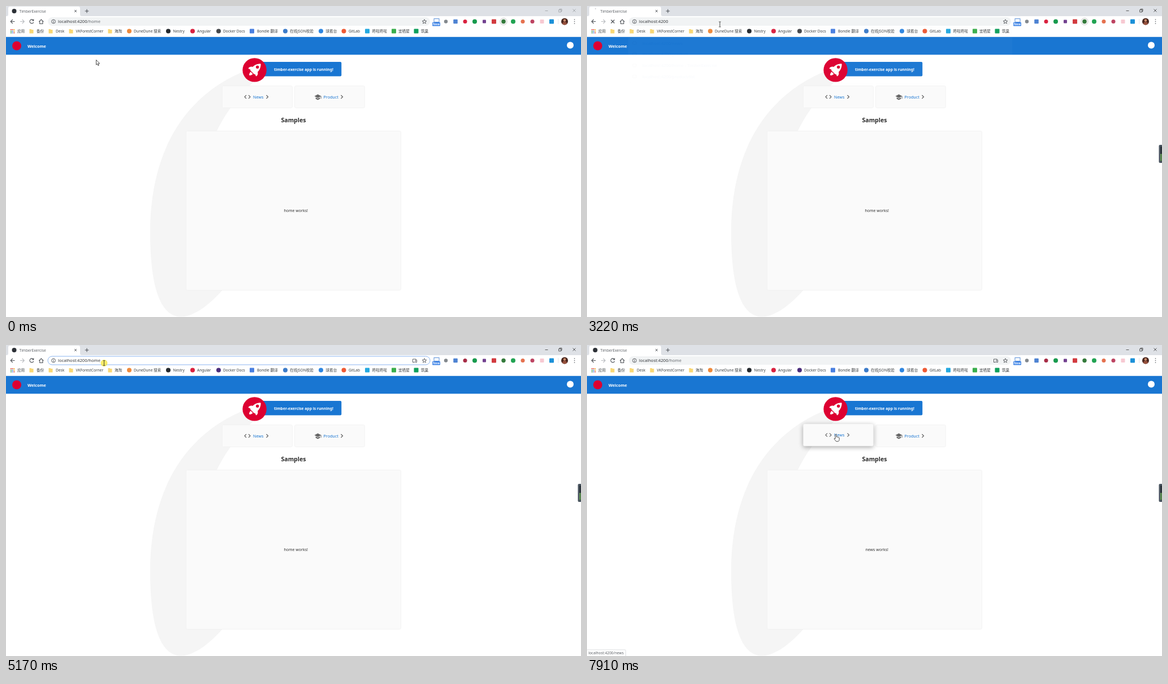
Write an HTML page that moves like this. It is 1017 px wide and 551 px high and loops after 7.99 s.

```html
<!DOCTYPE html>
<html lang="zh-CN">
<head>
<meta charset="utf-8">
<title>TimberExercise</title>
<style>
  html, body { margin: 0; width: 100%; height: 100%; overflow: hidden; background: #fff; }
  svg { display: block; width: 1017px; height: 551px; font: 6.6px "Noto Sans", "Noto Sans CJK SC", "Noto Sans CJK", sans-serif; }
  text { white-space: pre; }
  .line { fill: none; stroke: #4d5156; stroke-width: 1.1; }
</style>
</head>
<body>
<svg id="stage" viewBox="0 0 1017 551"></svg>
<script>
const LOOP = 7990;
const stage = document.getElementById('stage');

const rect = (x, y, w, h, fill, more = '') => `<rect x="${x}" y="${y}" width="${w}" height="${h}" fill="${fill}" ${more}/>`;
const dot = (x, y, r, fill, more = '') => `<circle cx="${x}" cy="${y}" r="${r}" fill="${fill}" ${more}/>`;
const text = (x, y, str, fill = '#3c4043', more = '') => `<text x="${x}" y="${y}" fill="${fill}" ${more}>${str}</text>`;
const line = (d, more = '') => `<path class="line" d="${d}" ${more}/>`;
const group = (id, body, more = '') => `<g id="${id}" ${more}>${body}</g>`;
const square = (x, y, s, fill) => rect(x - s / 2, y - s / 2, s, s, fill, 'rx="1"');
const chevron = x => line(`M${x - 1.5} 158l3 3l-3 3`, 'style="stroke:#666;stroke-width:1.3"');

// Bookmarks: icon kind, icon x, colour, label x, label
const marks = [
  ['folder', 45, '', 54, '备份'],
  ['folder', 79, '', 88, 'Desk'],
  ['folder', 115, '', 123.5, 'VKForestCorner'],
  ['folder', 184, '', 192, '海淘'],
  ['dot', 218, '#ee8a3c', 226, 'DuneDune 搜索'],
  ['dot', 287, '#24292e', 295.5, 'Nestry'],
  ['dot', 330, '#d9213f', 338, 'Angular'],
  ['dot', 376, '#44474b', 384, 'Docker Docs', 'docker'],
  ['square', 435, '#4a80e0', 444, 'Bondle 翻译'],
  ['dot', 494, '#3d7cc9', 502, '在线JSON校验'],
  ['dot', 557, '#2f86e0', 565.5, '球看台'],
  ['dot', 597.5, '#ee5a35', 606, 'GitLab'],
  ['square', 639, '#25a9e0', 647.5, '咚啦咚啦'],
  ['square', 686, '#3aae4c', 694, '宜栖屋'],
  ['square', 725.5, '#0f9f5c', 734, '筑巢']
];
const folder = x => `<path d="M${x - 3.5} 41h3l1 1h3v6.500h-7z" fill="#f8d775"/>`;
const mark = ([kind, x, fill, tx, label, id]) =>
  (kind === 'folder' ? folder(x) : kind === 'dot' ? dot(x, 44.5, 4, fill, id ? `id="${id}"` : '') : square(x, 44.5, 8, fill)) +
  text(tx, 47, label);

const apps = ['#e04a3f', '#e04a3f', '#f0b429', '#3f9d58', '#4a80e0', '#f0b429', '#3f9d58', '#4a80e0', '#e04a3f']
  .map((c, i) => rect(8 + i % 3 * 2.8, 41 + Math.floor(i / 3) * 2.8, 1.8, 1.8, c)).join('');

const addons =
  rect(757, 22.5, 9, 6, '#fff', 'stroke="#5a8fd8"') + rect(754, 29, 14, 6.5, '#3d83e6', 'rx="1"') +
  text(761, 34.2, 'New', '#fff', 'font-size="5.5" font-weight="600" text-anchor="middle"') +
  dot(778, 27.5, 3.2, '#83898e') + square(795, 27.5, 7.5, '#4d82d2') +
  dot(812, 27.5, 3.5, '#d9213f', 'id="addon"') + dot(829, 27.5, 4, '#179a4d') +
  square(846, 27.5, 6, '#71408f') + square(863, 27.5, 8, '#d23a3f') +
  dot(880, 27.5, 6.3, '#eef0ee', 'stroke="#c9ccc9" stroke-width=".7" id="ring"') + dot(880, 27.5, 3.7, '#337a3b') +
  dot(897, 27.5, 4, '#21a352') + dot(914, 27.5, 3.5, '#e5714f') + dot(931, 27.5, 3.5, '#bd4361') +
  square(948, 27.5, 7, '#f7c9d2') + square(965, 27.5, 8, '#1b90d8') +
  rect(976.5, 23, 0.7, 9, '#d5d8dc') + dot(988, 27.5, 6, '#47241d') +
  '<path d="M984 32q0-4 4-4t4 4q-4 3-8 0z" fill="#96503c"/>' + dot(988, 25.5, 2.3, '#c98b6c') +
  [24, 27.5, 31].map(y => dot(1005.5, y, 0.8, '#4d5156')).join('');

const nav =
  line('M15.500 27.500h-7M11.700 24l-3.500 3.500l3.500 3.500') +
  line('M25 27.500h7M28.800 24l3.500 3.500l-3.500 3.500', 'style="stroke:#b9bcc0"') +
  group('reload', line('M48.500 25.500a3.500 3.500 0 1 0 .3 3.200') + '<path d="M49.300 23v3.500h-3.500z" fill="#4d5156"/>') +
  group('stop', line('M42.500 24.500l6 6M48.500 24.500l-6 6', 'style="stroke-width:1.300"')) +
  line('M58.300 27.800l4-3.800l4 3.800M59.700 27v4.500h5.200v-4.500');

const rows = ['localhost:4200', 'localhost:4200/news', 'localhost:4200/product', 'localhost:4200/home - TimberExercise', 'localhost:4200/product/list'];
const popup = group('popup',
  rect(73, 20, 679, 116, '#fff', 'rx="7" filter="url(#soft)"') +
  rect(73, 36.5, 679, 19.5, '#e8eaed') +
  rows.map((r, i) => line(`M81 ${43.5 + i * 19.7}h6v5h-6z`, 'style="stroke:#777;stroke-width:.8"') +
    text(98, 49 + i * 19.7, r, i ? '#1967d2' : '#333', 'font-size="7.4"')).join(''));

const omnibox =
  rect(74, 20, 676, 15, '#f1f3f4', 'rx="7.5" id="bar"') +
  group('info', '<circle class="line" cx="84" cy="27.5" r="3.4" style="stroke-width:.9"/>' +
    rect(83.5, 27, 1, 2.7, '#4d5156') + rect(83.5, 25.3, 1, 1, '#4d5156')) +
  dot(84, 27.5, 4.2, '#2c3036', 'id="site"') +
  rect(0, 22.5, 0, 10.5, '#a4c8f6', 'id="sel"') +
  '<text id="url" y="30.3" font-size="7.6"><tspan id="host" fill="#33363a">localhost:4200</tspan><tspan id="path">/home</tspan></text>' +
  rect(0, 22.5, 0.8, 10, '#333', 'id="caret"') +
  group('device', line('M719.500 30v-5h6M719 30.500h4M724 26.500h2.500v4h-2.500z', 'style="stroke-width:.9"')) +
  group('star', line('M740 23.800l1.100 2.500 2.700.2-2.100 1.800.7 2.700-2.400-1.500-2.400 1.500.7-2.700-2.100-1.800 2.700-.2z', 'style="stroke-width:.9"'));

const tabs =
  rect(0, 0, 1017, 18, '#dee1e6') +
  '<path d="M1 18q3 0 3-3V4q0-3 3-3h121q3 0 3 3v11q0 3 3 3z" fill="#fff"/>' +
  dot(14.5, 9, 4, '#2c3036', 'id="icon"') +
  '<path id="spin" d="M14.500 4.800a4.200 4.200 0 1 1-4.200 4.200" fill="none" stroke="#8a9097" stroke-width="1.200"/>' +
  text(23.5, 11.5, 'TimberExercise', '#5f6368') +
  line('M121 7l4 4M125 7l-4 4', 'style="stroke-width:.9"') + line('M139.700 9h6.600M143 5.700v6.600') +
  `<path id="win" fill="none" stroke-width=".8" d="M953.500 8.500h5M977.700 6.800h4v4h-4zM979 6.800v-1.400h4v4h-1.300M1002.500 5.500l5 5M1007.500 5.500l-5 5"/>`;

const smoke = '<path transform="translate(255 104.500) scale(.4116) translate(-147.020 -140.940)" fill="#f5f5f5" ' +
  'd="M644.600 141S143 215.500 147 870.200s342.800 201.800 342.800 201.800S404.700 847.200 388.800 762.200c-27.100-145.500-11.600-384.100 271.900-609.100C671.100 139.400 644.600 141 644.600 141z"/>';

const rocket = dot(439.6, 113.4, 21.2, '#dd0031') +
  '<g transform="translate(428.500 102.300) scale(.4168)" fill="#fff">' +
  '<path d="M3.800 46a3.100 3.100 0 0 0 3.500 3.500a21.400 21.400 0 0 0 12.200-6.100L9.900 33.800A21.400 21.400 0 0 0 3.800 46z"/>' +
  '<path d="M53.300 3.200A3.100 3.100 0 0 0 50.100 0A48.200 48.200 0 0 0 18.300 13.400c-6-1.700-15-1.200-18.300 7.200A33.900 33.900 0 0 1 9.400 25.100l-.3.700a3 3 0 0 0 .6 3.500L24 43.600a2.900 2.900 0 0 0 3.500.6l.7-.3A33.900 33.900 0 0 1 32.600 53.300c8.600-3.700 8.900-12.300 7.200-18.300A48.200 48.200 0 0 0 53.300 3.200z"/></g>' +
  dot(444.7, 108.3, 2.7, '#dd0031');

const page = smoke +
  rect(0, 54.56, 1017, 31.78, '#1976d2') + dot(19, 70.5, 8, '#dd0031') + dot(998, 69.5, 6, '#fff') +
  text(38, 73.6, 'Welcome', '#fff', 'font-size="7.2" font-weight="600"') +
  rect(440, 99, 153.3, 25.5, '#1976d2', 'rx="2"') + rocket +
  text(474, 114.5, 'timber-exercise app is running!', '#fff', 'font-size="6.75" font-weight="600"') +
  rect(510.5, 141.5, 124, 39, '#fafafa', 'rx="2" stroke="#eee" stroke-width=".6"') +
  '<path d="M545.500 159.700l6-3.300 6 3.300-6 3.300zM547.700 162l3.800 2.100 3.800-2.100v2.400l-3.800 2.100-3.800-2.100z" fill="#666"/>' + rect(556.7, 159.7, 0.9, 4.5, '#666') +
  text(561.5, 163.6, 'Product', '#1976d2', 'font-size="7.15"') + chevron(594) +
  group('card', rect(382.5, 141.5, 124, 39, '#000', 'rx="2" filter="url(#lift)" id="shade"') +
    rect(382.5, 141.5, 124, 39, '#fafafa', 'rx="2" stroke="#eee" stroke-width=".6"') +
    line('M425 158l-3 3l3 3M429 158l3 3l-3 3', 'style="stroke:#666;stroke-width:1.200"') +
    text(437, 163.6, 'News', '#1976d2', 'font-size="7.2"') + chevron(462)) +
  text(508.5, 205.6, 'Samples', '#2b2b2b', 'font-size="10.6" font-weight="600" text-anchor="middle"') +
  rect(318.5, 221.5, 380, 282, '#fafafa', 'rx="2" stroke="#eee" stroke-width=".6"') +
  text(512.7, 365, 'home works!', '#333', 'font-size="7" text-anchor="middle" id="out"') +
  rect(0, 54.56, 1017, 497, '#fff', 'id="blank"');

const widget = group('widget', rect(1011.5, 246, 8, 32, '#4a5560', 'rx="2"') +
  rect(1014, 249, 3, 26, '#2c343c') + rect(1014.3, 262, 2, 12.5, '#6fae5c', 'id="meter"'));

const status = group('status', rect(-1, 540, 69.5, 13, '#fff', 'stroke="#d4d6d9" stroke-width=".8" rx="1.500" id="tip"') +
  text(2.5, 547.8, '', '#5f6368', 'font-size="6.5" id="tipText"'));

const pointer = group('pointer',
  dot(0, 0, 6, '#f5e642', 'fill-opacity=".8" id="press"') +
  group('arrow', '<path d="M0 0v8.700l2-1.800 1.400 3.200 1.400-.6-1.400-3.100h2.800z" fill="#fff" stroke="#222" stroke-width=".8"/>') +
  group('ibeam', line('M-1.800-4.500h1.300l.5.400.5-.4h1.300M0-4.200v8.400M-1.800 4.500h1.300l.5-.4.5.4h1.300', 'style="stroke:#222;stroke-width:.8"')) +
  group('hand', '<path d="M-1.300.8q0-1.500 1.100-1.500t1.100 1.500v3.200q1-.7 1.700.3 1.200-.5 1.700.5 1.400-.2 1.400 1.200v2.500q0 2.700-1.900 3.300h-3.600q-1.400-1.600-3.600-4.600.1-1.600 2.100-.3z" fill="#fff" stroke="#222" stroke-width=".8"/>'));

stage.innerHTML =
  '<defs><filter id="soft" x="-5%" y="-20%" width="110%" height="140%"><feDropShadow dx="0" dy="1" stdDeviation="2.500" flood-opacity=".35"/></filter>' +
  '<filter id="lift" x="-20%" y="-50%" width="140%" height="220%"><feOffset dy="2.100"/><feGaussianBlur stdDeviation="4.500"/></filter></defs>' +
  rect(0, 0, 1017, 551, '#fff') + page + tabs + rect(0, 18, 1017, 36.56, '#fff') + nav + apps + text(20, 47, '应用') +
  marks.map(mark).join('') + addons + popup + omnibox + widget + status + pointer;

const el = {};
stage.querySelectorAll('[id]').forEach(n => el[n.id] = n);
const show = (id, on) => el[id].style.opacity = +on;
const set = (id, attrs) => { for (const k in attrs) el[id].setAttribute(k, attrs[k]); };
const between = (t, a, b) => t >= a && t < b;

// Pointer keys: time, x, y, shape from then on
const path = [
  [0, 159.5, 95.5, 'arrow'], [70, 159.5, 95.5, 'arrow'], [370, 120, 58, 'arrow'], [600, 89, 27, 'ibeam'],
  [900, 146.5, 22.8, 'ibeam'], [980, 146.5, 22.8, 'ibeam'], [1140, 146.5, 25, 'ibeam'], [1210, 146.5, 25, 'ibeam'],
  [1290, 146.5, 27, 'ibeam'], [1520, 147, 27, 'ibeam'], [1600, 151, 27.5, 'ibeam'], [1910, 235, 32.5, 'ibeam'],
  [4560, 235, 32.5, 'ibeam'], [4760, 215, 32, 'ibeam'], [4860, 215, 32, 'ibeam'], [5000, 195, 32, 'ibeam'],
  [5660, 97, 32, 'ibeam'], [5790, 76, 30, 'arrow'], [5890, 76, 30, 'arrow'], [6140, 157.5, 27, 'arrow'],
  [6370, 157.5, 27, 'arrow'], [6700, 270, 110, 'arrow'], [7130, 446, 222, 'arrow'], [7210, 446, 226, 'arrow'],
  [7290, 443, 176, 'hand'], [7480, 440.5, 159, 'hand'], [LOOP, 440.5, 159, 'hand']
];
const STEP = 77;
function pose(t) {
  t = Math.max(0, 140 + STEP * Math.floor((t - 140) / STEP));
  const i = path.findIndex((k, n) => t < path[n + 1][0]);
  const [a, b] = [path[i], path[i + 1]];
  const p = (t - a[0]) / (b[0] - a[0]);
  return { x: a[1] + (b[1] - a[1]) * p, y: a[2] + (b[2] - a[2]) * p, shape: a[3] };
}

const URL_X = 92;
const stops = Array.from({ length: 20 }, (_, i) => URL_X + (i ? el.url.getSubStringLength(0, i) : 0));
const snap = x => stops.reduce((a, b) => Math.abs(b - x) < Math.abs(a - x) ? b : a);

function drawUrl(t, at) {
  const typed = between(t, 2760, 3220);
  const edit = between(t, 1290, 2760), again = between(t, 5000, 7560);
  const focus = edit || again;
  const x = typed ? URL_X + 6 : URL_X;
  set('url', { x });
  el.path.style.display = between(t, 2760, 3760) ? 'none' : '';
  set('path', { fill: focus ? '#33363a' : '#666a6f' });
  set('bar', { fill: focus || typed ? '#fff' : '#f1f3f4', stroke: focus ? '#8ab4f0' : 'none' });
  show('info', !typed);
  show('site', typed);
  show('star', !typed);
  show('device', edit || t >= 5000);

  let from = 0, to = 0;
  if (edit) { from = stops[14]; to = Math.max(from, snap(at.x)); }
  if (again && t < 6440) { from = t < 5740 ? snap(at.x) : URL_X; to = stops[19]; }
  set('sel', { x: from, width: to - from });
  show('caret', between(t, 1290, 1680) || typed);
  set('caret', { x: stops[14] - URL_X + x });
  show('popup', typed ? (t < 2840 ? 0 : t < 2920 ? 0.55 : 1) : between(t, 3220, 3320) ? 0.02 : 0);
}

function drawLoad(t) {
  const busy = between(t, 3220, 4090);
  show('stop', between(t, 3220, 4010));
  show('reload', !between(t, 3220, 4010));
  show('icon', !between(t, 3220, 3700));
  set('icon', { r: between(t, 3700, 4090) ? 2.7 : 4 });
  show('spin', busy);
  set('spin', {
    stroke: t < 3700 ? '#8a9097' : '#3d83e6',
    'stroke-dasharray': t < 3300 ? '1.2 40' : '14 40',
    transform: `rotate(${t < 3300 ? 0 : (t - 3300) * (t < 3700 ? -0.4 : 0.5)} 14.5 9)`
  });
  show('blank', between(t, 3450, 3760));
  const fresh = t >= 3450;
  set('docker', { fill: fresh ? '#4a2c7c' : '#44474b' });
  set('addon', { fill: !fresh ? '#d9213f' : t < 4010 ? '#a9c9a0' : '#a62b45' });
  show('ring', !fresh);
}

function drawStatus(t) {
  const wait = between(t, 3760, 4170);
  show('status', wait ? (t < 4010 ? 1 : t < 4090 ? 0.25 : 0.08) : t >= 7290);
  set('tip', { width: wait ? 339 : 69.5 });
  el.tipText.textContent = wait ? '正在连接...' : 'localhost:4200/news';
}

function draw(t) {
  const at = pose(t);
  drawUrl(t, at);
  drawLoad(t);
  drawStatus(t);
  set('win', { stroke: t < 1290 ? '#9a9da1' : '#333' });
  show('widget', t >= 1850);
  set('meter', { y: t < 2150 ? 266 : 262, height: t < 2150 ? 8.5 : 12.5 });

  const lift = Math.min(1, Math.max(0, (t - 7250) / 250));
  set('card', { transform: `translate(0 ${-1.6 * lift})` });
  show('shade', lift * 0.36);
  el.out.textContent = t < 7910 ? 'home works!' : 'news works!';

  set('pointer', { transform: `translate(${at.x} ${at.y})` });
  ['arrow', 'ibeam', 'hand'].forEach(s => show(s, s === at.shape));
  show('press', between(t, 1290, 2070) || between(t, 5000, 5810) || between(t, 7560, 7910));
}

const start = performance.now();
function tick() {
  draw((performance.now() - start) % LOOP);
  requestAnimationFrame(tick);
}
tick();
</script>
</body>
</html>
```
